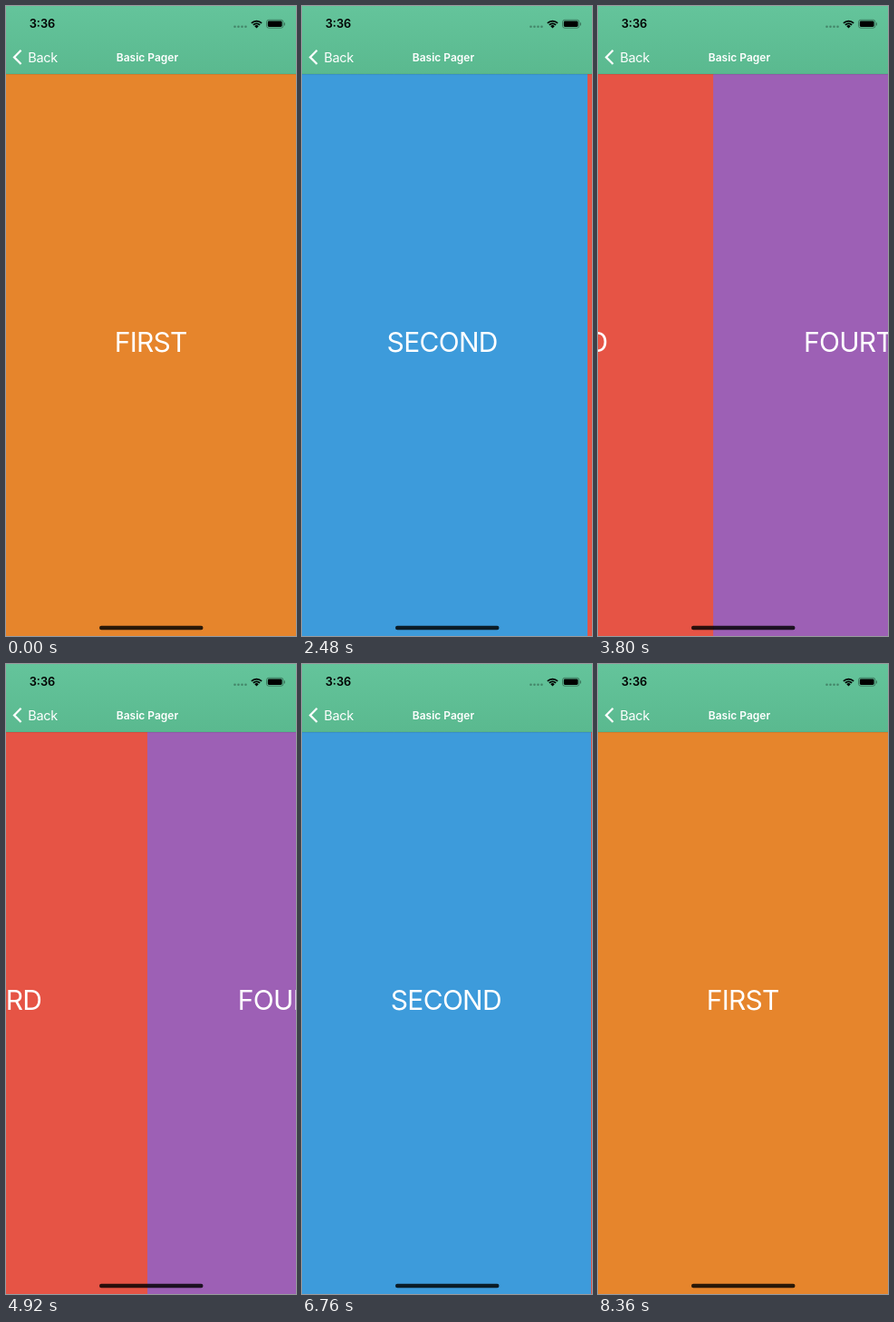
An HTML page with a canvas for the animation above (8400 ms loop, 320 by 694 pixels).

```html
<!DOCTYPE html>
<html lang="en">
<head>
<meta charset="utf-8">
<title>Basic Pager</title>
<style>
  html, body { margin: 0; width: 100%; height: 100%; overflow: hidden; }
  canvas { display: block; width: 320px; height: 694px; }
</style>
</head>
<body>
<canvas id="stage"></canvas>
<script>
const W = 320, H = 694, BAR = 75;
const LOOP = 8400, STEP = 40, OMEGA = 0.025;
const FONT = 'Inter, Roboto, "Liberation Sans", sans-serif';

const pages = [
  { label: 'FIRST', color: '#e6852c' },
  { label: 'SECOND', color: '#3d9bdb' },
  { label: 'THIRD', color: '#e65445' },
  { label: 'FOURTH', color: '#9d60b5' }
];

// Each swipe: finger down, finger at rest, release (ms), pages, finger travel (px)
const swipes = [
  { down: 1510, rest: 1970, up: 1970, from: 0, to: 1, travel: 245 },
  { down: 2476, rest: 3075, up: 3075, from: 1, to: 2, travel: 250 },
  { down: 3580, rest: 4170, up: 4170, from: 2, to: 3, travel: 256 },
  { down: 4770, rest: 5355, up: 5355, from: 3, to: 2, travel: 265 },
  { down: 5740, rest: 6500, up: 6500, from: 2, to: 1, travel: 252 },
  { down: 7062, rest: 7920, up: 8010, from: 1, to: 0, travel: 236 }
];

const canvas = document.getElementById('stage');
const ctx = canvas.getContext('2d');
const dpr = window.devicePixelRatio || 1;
canvas.width = W * dpr;
canvas.height = H * dpr;
ctx.scale(dpr, dpr);

const easeOut = p => 1 - (1 - p) ** 3;

// Critically damped spring, 1 at release and 0 at rest
const spring = t => (1 + OMEGA * t) * Math.exp(-OMEGA * t);

function scrollAt(t) {
  let x = 0;
  for (const s of swipes) {
    if (t < s.down) break;
    const moved = t < s.up
      ? s.travel * easeOut(Math.min(1, (t - s.down) / (s.rest - s.down)))
      : W - (W - s.travel) * spring(t - s.up);
    x = s.from * W + Math.sign(s.to - s.from) * moved;
  }
  return Math.abs(x - Math.round(x / W) * W) < 0.45 ? Math.round(x / W) * W : x;
}

function text(str, x, y, font, color, spacing = 0, align = 'left') {
  ctx.font = `${font} ${FONT}`;
  ctx.letterSpacing = spacing + 'px';
  ctx.textAlign = align;
  ctx.fillStyle = color;
  ctx.fillText(str, align === 'center' ? x + spacing / 2 : x, y);
}

function pill(x, y, w, h, r, color) {
  ctx.fillStyle = color;
  ctx.beginPath();
  ctx.roundRect(x, y, w, h, r);
  ctx.fill();
}

function drawPages(scroll) {
  const first = Math.floor(scroll / W);
  for (let i = first; i <= first + 1 && i < pages.length; i++) {
    const x = i * W - scroll;
    ctx.fillStyle = pages[i].color;
    ctx.fillRect(x, BAR, W, H - BAR);
    text(pages[i].label, x + W / 2, 381, '400 30px', '#fff', -0.7, 'center');
  }
}

function drawWifi(x, y) {
  const a = -Math.PI * 0.75, b = -Math.PI * 0.25;
  ctx.strokeStyle = ctx.fillStyle = '#000';
  ctx.lineWidth = 1.8;
  for (const r of [7.9, 5.1]) {
    ctx.beginPath();
    ctx.arc(x, y, r, a, b);
    ctx.stroke();
  }
  ctx.beginPath();
  ctx.moveTo(x, y);
  ctx.arc(x, y, 3.2, a, b);
  ctx.fill();
}

function drawBattery() {
  ctx.strokeStyle = 'rgba(0,0,0,0.4)';
  ctx.lineWidth = 0.9;
  ctx.beginPath();
  ctx.roundRect(287.5, 15.3, 18.4, 8.9, 2.4);
  ctx.stroke();
  pill(288.8, 16.6, 15.8, 6.3, 1.4, '#000');
  pill(306.8, 18.2, 1.1, 3.2, 0.5, 'rgba(0,0,0,0.4)');
}

function drawHeader() {
  const g = ctx.createLinearGradient(0, 0, 0, BAR);
  g.addColorStop(0, '#64c49b');
  g.addColorStop(1, '#5ab98f');
  ctx.fillStyle = g;
  ctx.fillRect(0, 0, W, BAR);
  ctx.fillStyle = 'rgba(0,0,0,0.2)';
  ctx.fillRect(0, BAR - 0.2, W, 0.6);

  text('3:36', 25.7, 24.3, '600 12.8px', '#000');
  for (let i = 0; i < 4; i++) pill(251.2 + i * 4, 21.4, 2.6, 2.6, 1.3, 'rgba(0,0,0,0.3)');
  drawWifi(276.5, 24.5);
  drawBattery();

  ctx.strokeStyle = '#fff';
  ctx.lineWidth = 2.2;
  ctx.beginPath();
  ctx.moveTo(16.6, 48.8);
  ctx.lineTo(9, 56.4);
  ctx.lineTo(16.6, 64);
  ctx.stroke();
  text('Back', 24.3, 61.6, '400 14.5px', '#fff', -0.3);
  text('Basic Pager', 156, 60.8, '600 12px', '#fff', 0, 'center');
}

function frame(now) {
  const t = Math.floor((now % LOOP) / STEP) * STEP;
  drawPages(scrollAt(t));
  drawHeader();
  pill(103, 682.8, 114.5, 4.4, 2.2, 'rgba(0,0,0,0.82)');
}

const start = performance.now();
function tick() {
  frame(performance.now() - start);
  requestAnimationFrame(tick);
}
tick();
</script>
</body>
</html>
```
